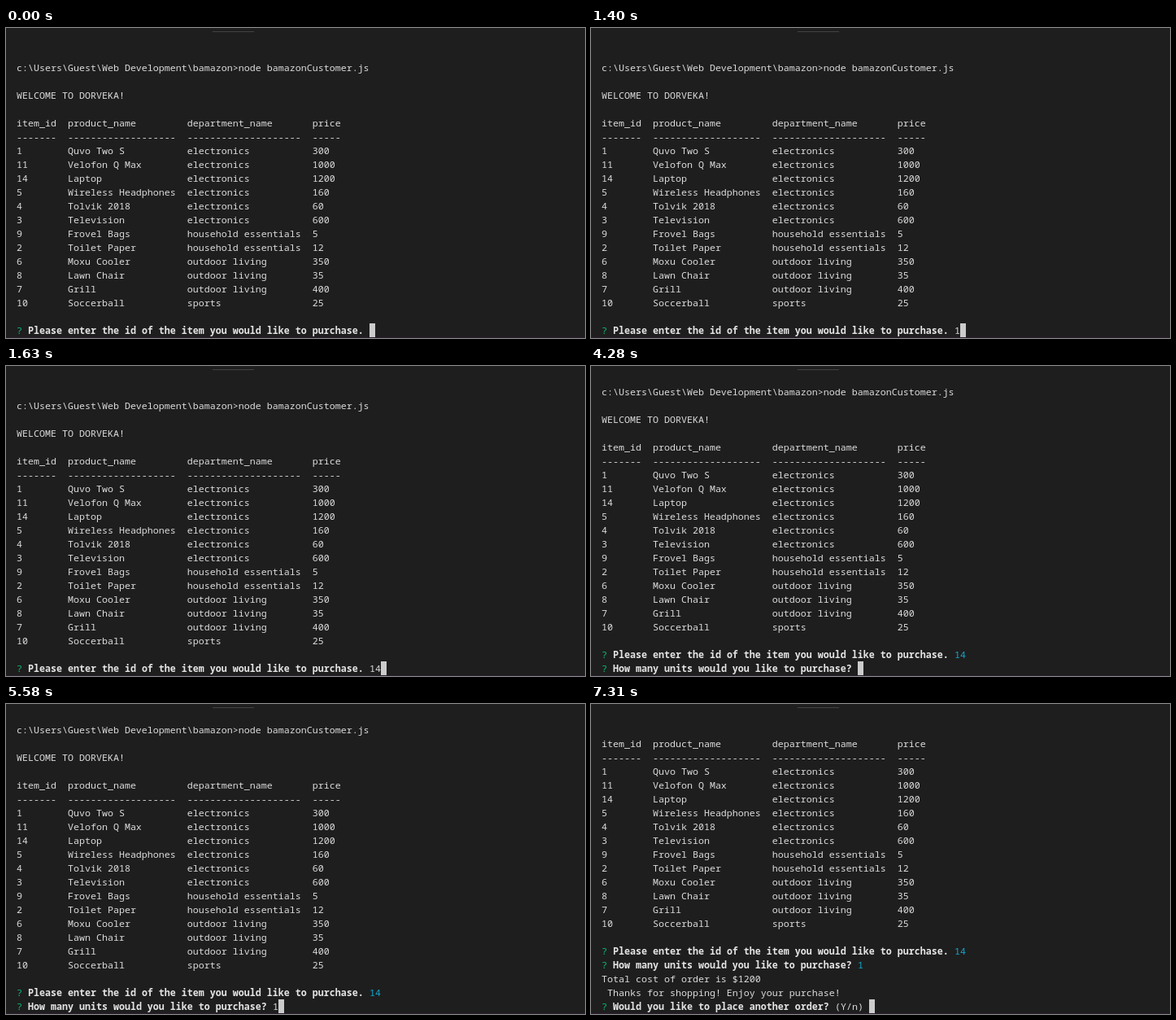
These frames come from a looping animation (712 by 381 pixels, 8000 ms). An HTML page with a canvas:

```html
<!DOCTYPE html>
<html lang="en">
<head>
<meta charset="utf-8">
<title>Terminal store</title>
<style>
  html, body { margin: 0; width: 100%; height: 100%; overflow: hidden; background: #1e1e1e; }
  canvas { display: block; width: 712px; height: 381px; }
</style>
</head>
<body>
<canvas id="screen"></canvas>
<script>
const W = 712, H = 381, LOOP = 8000;
const LEFT = 13, CELL = 7, LINE = 17, LAST_TOP = 363, VIEW_TOP = 22, BASE = 13;
const FONT = '11.667px "Noto Sans Mono", "DejaVu Sans Mono", monospace';
const COLOR = { bg: '#1e1e1e', text: '#dcdcdc', bold: '#e5e5e5', green: '#0dbc79', cyan: '#11a8cd', cursor: '#cccccc' };

const canvas = document.getElementById('screen');
const ctx = canvas.getContext('2d');
const dpr = window.devicePixelRatio || 1;
canvas.width = Math.round(W * dpr);
canvas.height = Math.round(H * dpr);

const row = (id, name, dept, price) =>
  String(id).padEnd(9) + name.padEnd(21) + dept.padEnd(22) + price;
const dash = n => '-'.repeat(n);

const listing = [
  'c:\\Users\\Guest\\Web Development\\bamazon>node bamazonCustomer.js',
  '',
  'WELCOME TO DORVEKA!',
  '',
  row('item_id', 'product_name', 'department_name', 'price'),
  row(dash(7), dash(19), dash(20), dash(5)),
  row(1, 'Quvo Two S', 'electronics', 300),
  row(11, 'Velofon Q Max', 'electronics', 1000),
  row(14, 'Laptop', 'electronics', 1200),
  row(5, 'Wireless Headphones', 'electronics', 160),
  row(4, 'Tolvik 2018', 'electronics', 60),
  row(3, 'Television', 'electronics', 600),
  row(9, 'Frovel Bags', 'household essentials', 5),
  row(2, 'Toilet Paper', 'household essentials', 12),
  row(6, 'Moxu Cooler', 'outdoor living', 350),
  row(8, 'Lawn Chair', 'outdoor living', 35),
  row(7, 'Grill', 'outdoor living', 400),
  row(10, 'Soccerball', 'sports', 25),
  ''
].map(plain);

function plain(text) {
  return [{ text, color: COLOR.text }];
}

function prompt(question, answer, done) {
  return [
    { text: '? ', color: COLOR.green },
    { text: question + ' ', color: COLOR.bold, bold: true },
    { text: answer, color: done ? COLOR.cyan : COLOR.text }
  ];
}

// Terminal contents at time t; the cursor follows the last line.
function transcript(t) {
  const id = t < 1400 ? '' : t < 1630 ? '1' : '14';
  const units = t < 5580 ? '' : '1';
  const lines = [...listing,
    prompt('Please enter the id of the item you would like to purchase.', id, t >= 2330)];
  if (t >= 2330) lines.push(prompt('How many units would you like to purchase?', units, t >= 6280));
  if (t >= 6280) lines.push(
    plain('Total cost of order is $1200'),
    plain(' Thanks for shopping! Enjoy your purchase!'),
    prompt('Would you like to place another order?', '(Y/n) ', false));
  return lines;
}

function drawLine(parts, top) {
  let col = 0;
  for (const { text, color, bold } of parts) {
    ctx.font = (bold ? 'bold ' : '') + FONT;
    ctx.fillStyle = color;
    ctx.fillText(text, LEFT + col * CELL, top + BASE);
    col += text.length;
  }
  return LEFT + col * CELL;
}

function draw(t) {
  ctx.setTransform(dpr, 0, 0, dpr, 0, 0);
  ctx.fillStyle = COLOR.bg;
  ctx.fillRect(0, 0, W, H);
  ctx.fillStyle = '#424242';
  ctx.fillRect(254, 4, 51, 1);
  ctx.fillStyle = '#2a1d2d';
  ctx.fillRect(0, 380, W, 1);

  const lines = transcript(t);
  let end = LEFT;
  lines.forEach((parts, i) => {
    const top = LAST_TOP - (lines.length - 1 - i) * LINE;
    if (top >= VIEW_TOP) end = drawLine(parts, top);
  });
  ctx.fillStyle = COLOR.cursor;
  ctx.fillRect(end, LAST_TOP, CELL, LINE);
}

const start = performance.now();
function tick() {
  draw((performance.now() - start) % LOOP);
  requestAnimationFrame(tick);
}
tick();
</script>
</body>
</html>
```
